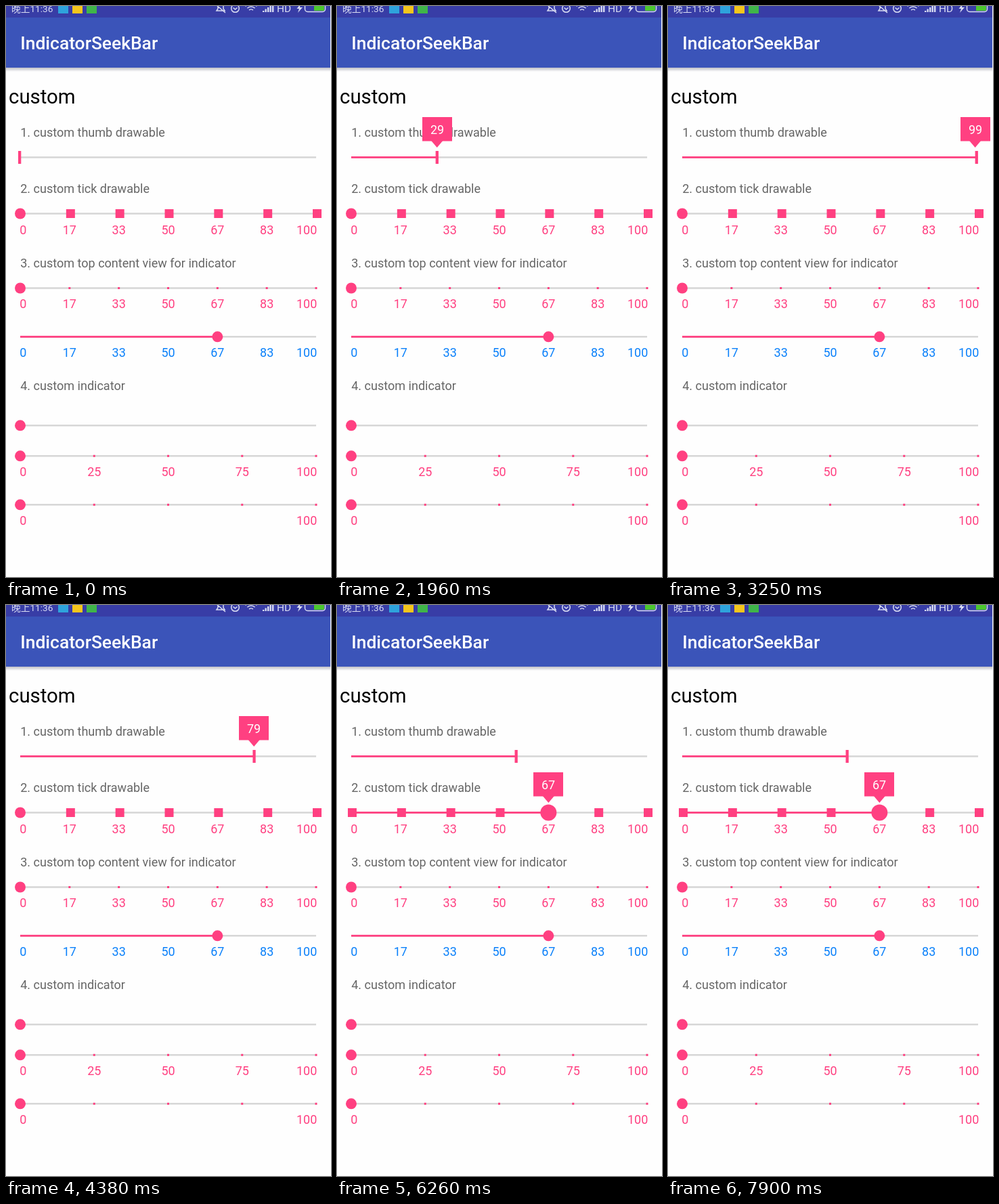
These frames come from a looping animation (480x843 px, 7.99 s). An HTML page with a canvas:

```html
<!DOCTYPE html>
<html lang="en">
<head>
<meta charset="utf-8">
<title>IndicatorSeekBar</title>
<style>
html, body { margin: 0; width: 100%; height: 100%; overflow: hidden; background: #fefefe; }
canvas { display: block; }
</style>
</head>
<body>
<canvas id="stage" width="480" height="843"></canvas>
<script>
const g = document.getElementById('stage').getContext('2d');
const LOOP = 7990, STEP = 93, LEFT = 21, SPAN = 437;
const PINK = '#ff4081', BLUE = '#0a80fa', GREY = '#d5d5d5', PAPER = '#fefefe', INK = '#d8dcf2';
const SANS = 'Roboto, "Noto Sans CJK SC", sans-serif';

const clamp = u => Math.min(1, Math.max(0, u));
const place = percent => LEFT + SPAN * percent / 100;

function rect(x, y, w, h, color) {
  g.fillStyle = color;
  g.fillRect(x, y, w, h);
}

function circle(x, y, r, color = PINK) {
  g.fillStyle = color;
  g.beginPath();
  g.arc(x, y, r, 0, 7);
  g.fill();
}

function arc(x, y, r, from = 0, to = 7) {
  g.beginPath();
  g.arc(x, y, r, from, to);
  g.stroke();
}

function text(s, x, y, size, color, align = 'left', weight = 400) {
  g.font = `${weight} ${size}px ${SANS}`;
  g.textAlign = align;
  g.fillStyle = color;
  g.fillText(s, x, y);
}

function track(y, end = LEFT) {
  rect(LEFT, y - 1.2, SPAN, 2.4, GREY);
  rect(LEFT, y - 1.4, Math.max(0, end - LEFT), 2.8, PINK);
}

function ticks(y, parts, size, shift = 0, skip = 0) {
  for (let i = 0; i <= parts; i++) {
    if (i !== skip) rect(place(100 * i / parts) + shift - size / 2, y - size / 2, size, size, PINK);
  }
}

// the outer labels line up with the ends of the bar, the others with their ticks
function labels(y, parts, color = PINK) {
  for (let i = 0; i <= parts; i++) {
    const v = 100 * i / parts;
    const [x, align] = i === 0 ? [20.3, 'left'] : i === parts ? [459.3, 'right'] : [place(v), 'center'];
    text(Math.round(v), x, y, 18, color, align);
  }
}

function bubble(x, top, value) {
  g.font = `18px ${SANS}`;
  const w = Math.ceil(g.measureText(value).width + 23.3);
  const left = Math.min(Math.round(x - w / 2), 479 - w);
  rect(left, top, w, 35.5, PINK);
  g.beginPath();
  g.moveTo(x - 8.5, top + 35);
  g.lineTo(x + 8.5, top + 35);
  g.lineTo(x, top + 45);
  g.fill();
  text(value, left + w / 2, top + 25, 18, '#fff', 'center');
}

function statusBar() {
  text('晚上11:36', 8, 9, 13.7, INK);
  ['#2ea3dc', '#f5c61c', '#3fb549'].forEach((color, i) => rect(77 + 21 * i, -4, 15, 15, color));
  g.strokeStyle = g.fillStyle = INK;
  g.lineWidth = 1.5;
  g.stroke(new Path2D('M311 7l2 -3v-6h8v6l2 3zM310 -2l14 12M335.5 2.5l3 2.5l3 -2.5'));
  g.fill(new Path2D('M435 -3l-5.5 7h3.5l-2 6l7 -8h-4z'));
  arc(338.5, 3.5, 5.8);
  for (let r = 4; r <= 12; r += 4) arc(362, 9, r, -2.35, -0.79);
  for (let i = 0; i < 5; i++) rect(379 + i * 3.5, 7 - i * 2.5, 2.4, 2 + i * 2.5, INK);
  text('HD', 400, 9, 15.5, INK);
  g.beginPath();
  g.roundRect(441.5, -4, 30, 12.5, 4);
  g.stroke();
  rect(455, -2, 15, 9, '#4cc72e');
}

function header() {
  const shadow = g.createLinearGradient(0, 91, 0, 97);
  shadow.addColorStop(0, '#bfbfc6');
  shadow.addColorStop(1, PAPER);
  rect(0, 91, 480, 6, shadow);
  rect(0, 0, 480, 17, '#383da6');
  rect(0, 17, 480, 74, '#3b54b9');
  statusBar();
  text('IndicatorSeekBar', 21.3, 64, 26.4, '#fff', 'left', 500);
}

function heading(y, s) {
  text(s, 21.2, y, 18.05, '#666');
}

function stillBar(y, value = 0, parts = 0) {
  track(y, place(value));
  if (parts) ticks(y, parts, 3);
  circle(place(value), y, 8);
}

function page() {
  rect(0, 0, 480, 843, PAPER);
  header();
  text('custom', 4, 144, 29.4, '#000');
  heading(192.5, '1. custom thumb drawable');
  heading(276, '2. custom tick drawable');
  heading(386, '3. custom top content view for indicator');
  heading(567, '4. custom indicator');
  stillBar(416.5, 0, 6);
  labels(446.3, 6);
  stillBar(488.3, 200 / 3);
  labels(518, 6, BLUE);
  stillBar(619.3);
  stillBar(664.3, 0, 4);
  labels(694.3, 4);
  stillBar(736.3, 0, 4);
  labels(766, 1);
}

// speeds up to the right end, rests, then slows down on the way back
function progress(t) {
  if (t < 610) return 0;
  const at = 1010 + Math.floor((t - 1010) / STEP) * STEP;
  const out = clamp((at - 1010) / 2237), back = clamp((at - 3750) / 1445);
  return back ? 55.95 + 44.05 * (1 - back) ** 1.165 : 2 + 98 * out ** 1.46;
}

// snaps from tick to tick, then returns at an even pace
function tickAt(t) {
  if (t < 5430) return 0;
  if (t > 7130) return 6 - Math.floor((t - 7130) / 290);
  return 1 + Math.floor(5 * clamp((t - 5430) / 1540) ** 0.8);
}

function thumbBar(t) {
  const v = progress(t), shown = Math.floor(v), x = 20 + v * SPAN / 100;
  track(223.4, x);
  rect(x - 2, 214, 4.3, 19, PINK);
  if (t >= 1010 && t < 5240) bubble(place(shown), 164, shown);
}

function tickBar(t) {
  const i = tickAt(t), v = 100 * i / 6, x = place(v);
  track(306.5, x);
  ticks(306.5, 6, 13, 1.5, i);
  circle(x, 306.5, t < 5430 ? 8 : 12);
  labels(336.5, 6);
  if (t >= 5530) bubble(x, 247, Math.round(v));
}

function frame(now) {
  const t = now % LOOP;
  page();
  thumbBar(t);
  tickBar(t);
  rect(479, 0, 1, 843, '#fff');
  requestAnimationFrame(frame);
}
requestAnimationFrame(frame);
</script>
</body>
</html>
```
